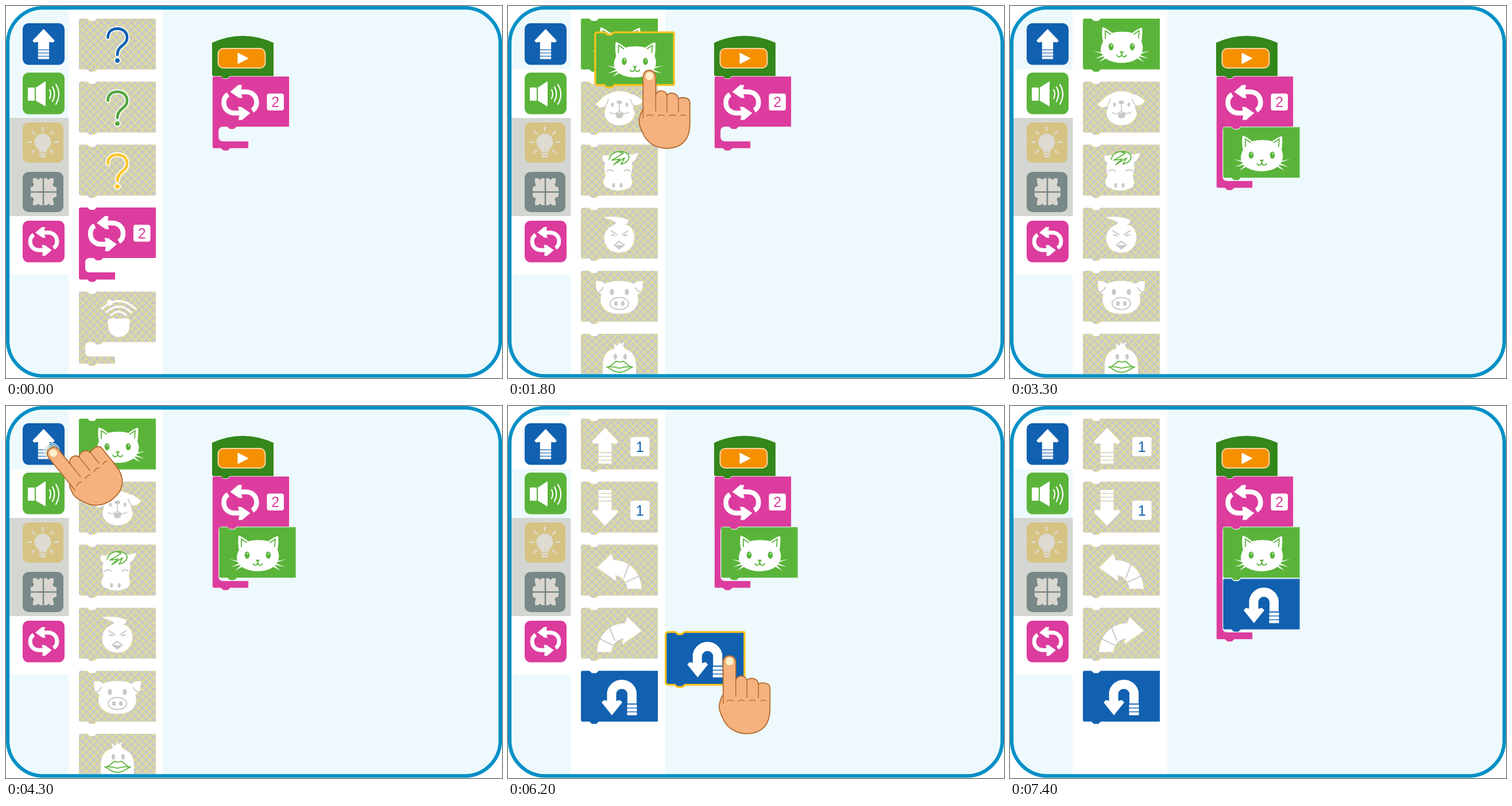
Animation of 864 by 648 pixels, one loop 9400 ms. Source, as an HTML page:

```html
<!DOCTYPE html>
<html lang="en">
<head>
<meta charset="utf-8">
<title>Block coding</title>
<style>
  html, body { margin: 0; width: 100%; height: 100%; overflow: hidden; background: #fff; }
  svg { display: block; width: 864px; height: 648px; }
  text { font: 25px "Liberation Sans", Arial, sans-serif; text-anchor: middle; }
  .w { fill: #fff; }
  .line { fill: none; stroke: #fff; stroke-linecap: round; }
  .g { fill: #c9c9c6; }
  .gl { fill: none; stroke: #c9c9c6; stroke-width: 2; stroke-linecap: round; }
  .skin { fill: #f6b27e; stroke: #b2692e; stroke-width: 1.8; stroke-linejoin: round; }
  .crease { fill: none; stroke: #b2692e; stroke-width: 1.5; stroke-linecap: round; }
  .edge { stroke: #f4fafa; stroke-width: .7; }
  .lit { stroke: #fdc21c; stroke-width: 6.5; stroke-linejoin: round; paint-order: stroke; }
</style>
</head>
<body>
<svg id="stage" viewBox="0 0 864 648"></svg>
<script>
const BLUE = '#1161b0', GREEN = '#5ab43a', PINK = '#dc3c9e', OFF = 'url(#off)';
const at = (x, y, body, more = '') => `<g transform="translate(${x} ${y}) ${more}">${body}</g>`;
const path = (d, attrs = 'class="w"') => `<path d="${d}" ${attrs}/>`;
const oval = (x, y, rx, ry, attrs = 'class="w"') =>
  `<ellipse cx="${x}" cy="${y}" rx="${rx}" ry="${ry}" ${attrs}/>`;
const box = (x, y, w, h, r, attrs = 'class="w"') =>
  `<rect x="${x}" y="${y}" width="${w}" height="${h}" rx="${r}" ${attrs}/>`;
const group = (id, body) => `<g id="${id}">${body}</g>`;

// Block outlines
const notch = 'c1 0 1.5 .5 2 1l2 2c.5 .5 1 1 2 1h6c1 0 1.5 -.5 2 -1l2 -2c.5 -.5 1 -1 2 -1';
const tab = 'c-1 0 -1.5 .5 -2 1l-2 2c-.5 .5 -1 1 -2 1h-6c-1 0 -1.5 -.5 -2 -1l-2 -2c-.5 -.5 -1 -1 -2 -1';
const plain = `M0 3Q0 0 3 0H14${notch}H134V88.6H32${tab}H3Q0 88.6 0 85.6Z`;
const wrap = gap => `M0 3Q0 0 3 0H14${notch}H134V88H43${tab}H19Q11 88 11 96V${80 + gap}` +
  `Q11 ${88 + gap} 19 ${88 + gap}H63V${100.5 + gap}H32${tab}H3Q0 ${100.5 + gap} 0 ${97.5 + gap}Z`;
const block = (d, fill, icon, cls = '') => path(d, `fill="${fill}" class="${cls}"`) + icon;

const digit = (x, y, size, n, color) => box(x, y, size, size, 4) +
  `<text x="${x + size / 2}" y="${y + size / 2 + 9}" fill="${color}">${n}</text>`;

// Icons
const half = path('M-2 -18.5H9C22 -18.5 28.5 -10 28.5 0C28.5 6 26 11 21 14', 'class="line" style="stroke-width:8.5;stroke-linecap:butt"') +
  path('M-17.5 -18.5L-3.5 -30.5H3L1 -18.5L4 -7.5L-2.5 -8Z');
const cycle = half + `<g transform="rotate(180)">${half}</g>`;
const loopIcon = at(48.5, 45.5, cycle) + digit(95, 30, 29.5, 2, PINK);

const bars = (x, y, w) => [0, 6.6, 13.2].map(d => box(x, y + d, w, 5.2, 0)).join('');
const arrow = path('M0 0L23 24L20 28L11.5 27V42.5H-11.5V27L-20 28L-23 24Z') + bars(-11.5, 44, 23);

const uturn = path('M53.5 54V38.5A18 18 0 0 1 89 38.5V57', 'class="line" style="stroke-width:16;stroke-linecap:butt"') +
  path('M36 55L40 51L54 54L68 51L72 55L54 77.5Z') + bars(80.5, 59, 17);

const turn = path('M28 40L53 16L57 27C85 27 104 48 106 77H81C80 65 73 56 60 53L62 64Z') +
  path('M85 32L75 57M102 54L79 65', 'class="gl"');

const ask = color => {
  const d = 'M50.5 33C50.5 23 57 17.5 67 17.5S84 24 84 33C84 47 67 46 67 63';
  return path(d, 'class="line" style="stroke-width:8.5"') +
    path(d, `fill="none" stroke="${color}" stroke-width="4.8" stroke-linecap="round"`) +
    oval(67, 73, 5, 5, `fill="${color}" stroke="#fff" stroke-width="2"`);
};

const robot = path('M40 30Q69 3 99 30', 'class="line" style="stroke-width:3.4"') +
  path('M48 36Q69 16 91 36', 'class="line" style="stroke-width:3.4"') +
  path('M56 41Q69 29 82 41', 'class="line" style="stroke-width:3.4"') + oval(54, 19.5, 5, 5) +
  path('M50 52Q50 47 56 47Q61 45 64 47H76Q79 45 83 47Q89 47 89 52C90 56 87 58 88 62C87 72 79 79 69.5 79S52 72 51 62C52 58 49 56 50 52Z');

const whiskers = 'M18 56L38 60L37 62.5ZM20 70L36 63L38 65.5ZM28 76L38 67L41 69Z';
const cat = path('M34 15C41 17 46 21 51 25C60 22 77 22 86 25C91 21 97 17 103 16C104 24 103 34 102 40C104 45 105 50 104 54C102 68 88 77 68 77S33 69 31 55C31 50 32 45 35 40C33 32 33 24 34 15Z') +
  path(whiskers) + at(135, 0, path(whiskers), 'scale(-1 1)') +
  [49, 86].map(x => oval(x, 49, 4.3, 6.2, `fill="${GREEN}"`) + oval(x + .8, 46.5, .9, 1.5)).join('') +
  path('M63.5 57H71.5L67.5 62Z', `fill="${GREEN}"`) +
  path('M59.5 63.5Q60 67 63.5 66.5Q67 66 67.5 61Q68 66 71.5 66.5Q75 67 75.5 63.5M39 34L39 21L48 27M97 34L98 21L89 27',
    `fill="none" stroke="${GREEN}" stroke-width="1.8" stroke-linecap="round"`);

const dog = path('M48 22C57 15 78 15 87 22C95 22 101 28 108 33C104 41 96 43 91 40C90 45 93 51 94 56C91 69 80 76 67 76S43 69 41 56C41 51 44 45 44 40C38 48 30 45 26 39C34 34 39 24 48 22Z') +
  [55, 80].map(x => oval(x, 40, 2.4, 3.6, 'class="g"')).join('') + oval(67, 36, 5, 3.2, 'class="g"') +
  path('M67 37V51M51 54Q59 59 67 51Q76 59 84 53M91 40Q87 36 86 30M44 40Q47 36 48 30', 'class="gl" style="stroke-width:1.6"') +
  path('M61 56Q67 52 74 56Q74 64 67 64T61 56Z', 'class="g"');

const horse = path('M38 18C43 20 47 19 52 18C58 11 75 11 83 17C89 18 94 16 99 14C99 22 94 28 89 31C91 42 87 50 87 56C92 66 88 77 78 77C73 81 55 81 50 76C39 76 36 64 43 55C42 46 39 39 43 32C38 30 37 24 38 18Z') +
  path('M45 47Q50 41 56 46M75 46Q80 41 86 46', 'class="gl"') +
  oval(57, 71, 2.5, 4, 'class="g"') + oval(70, 71, 2.5, 4, 'class="g"') +
  path('M49 26C51 18 58 12 66 12L74 15L54 27L68 25L57 35L76 23L70 34C78 32 83 28 84 22C83 14 75 11 66 12',
    `fill="#fff" stroke="${GREEN}" stroke-width="1.8" stroke-linejoin="round"`);

const chick = path('M39 17C52 14 72 16 82 21C84 26 80 28 77 29C103 36 97 79 67 78C38 78 33 45 51 33C57 30 60 29 61 26C55 21 47 19 39 17Z') +
  path('M52 40L63 47M82 40L72 47', 'class="gl"') +
  path('M51 48Q57 44 61 50ZM83 48Q77 44 73 50ZM57 65L67 57L77 65L67 73Z', 'class="g"') +
  path('M60 65L67 60L74 65Z');

const pig = path('M42 23C52 16 82 16 92 23C98 17 103 18 108 18C107 30 109 37 98 41C101 50 100 56 97 61C92 71 82 75 67 75S42 71 37 61C34 56 33 50 36 41C25 37 27 30 26 18C32 18 37 17 42 23Z') +
  [54, 80].map(x => oval(x, 37, 3.6, 5.5, 'class="g"')).join('') + oval(67, 57, 16, 10.5, 'class="gl"') +
  [61, 73].map(x => oval(x, 57, 3.2, 4.3, 'class="g"')).join('') +
  path('M28 38Q36 36 39 29M106 38Q98 36 95 29', 'class="gl"');

const duck = path('M58 26Q59 21 57 17L64 21Q65 16 68 14L69 19Q72 15 76 15L73 20Q75 23 76 26C92 31 95 42 96 54V76H38V54C39 42 42 30 58 26Z') +
  [60, 77].map(x => oval(x, 40, 3, 5, 'class="g"')).join('') +
  path('M45 58C54 58 58 48 63 48L68 49.5L73 48C78 48 82 58 90 58C83 60 79 67 67 67S53 60 45 58ZM45 58Q56 56 67 60Q79 56 90 58',
    `fill="#fff" stroke="${GREEN}" stroke-width="1.8" stroke-linejoin="round"`);

// Category column
const rays = [135, 180, 225, 270, 315, 0, 45].map(a =>
  `<path d="M19 0H27" transform="rotate(${a})" stroke="#dedbd2" stroke-width="2.6"/>`).join('');
const bulb = at(64, 237, rays + path('M-8 12A14.5 14.5 0 1 1 8 12L6 17H-6Z', 'fill="#dedbd2"') +
  box(-6.5, 18.5, 13, 3, 1, 'fill="#dedbd2"') + path('M-6 23H6L3 27H-3Z', 'fill="#dedbd2"'));
const puzzle = path('M47 300H53Q56 305 59 300H71Q74 305 77 300H83V308Q80 311 83 314L88 316V332L83 334Q80 337 83 340V347H77Q74 342 71 347H59Q56 342 53 347H47V340Q50 337 47 334L43 332V316L47 314Q50 311 47 308Z',
    'fill="#d9d6cf"') +
  path('M65 299V348M42 324H89', 'stroke="#788988" stroke-width="2.6"');
const categories =
  box(29, 30, 73, 72.5, 10, `fill="${BLUE}"`) + at(65.5, 40, arrow, 'scale(.84)') +
  box(29, 116, 73, 72.5, 10, `fill="${GREEN}"`) + box(38, 142, 12, 23, 1) + path('M52 142L69 131V175L52 165Z') +
  path('M76 146Q80 153 76 161M81 141Q88 153 81 166M87 137Q97 153 87 171', 'class="line" style="stroke-width:2.2"') +
  box(29, 203, 71, 70, 10, 'fill="#d6c384"') + bulb +
  box(29, 289, 71, 70, 10, 'fill="#788988"') + puzzle +
  box(29, 374, 73, 72.5, 10, `fill="${PINK}"`) + at(65.5, 410, cycle, 'scale(.82)');

// Palette panels: six rows, 110px apart
const row = (i, icon, fill = OFF) => at(127, 22 + i * 109.8, block(plain, fill, icon));
const panels = {
  loops: row(0, ask(BLUE)) + row(1, ask('#53a63f')) + row(2, ask('#fcc52c')) +
    at(127, 351, block(wrap(25), PINK, loopIcon)) + at(127, 497.5, block(wrap(25), OFF, robot)),
  sounds: row(0, cat, GREEN) + [dog, horse, chick, pig, duck].map((icon, i) => row(i + 1, icon)).join(''),
  moves: row(0, at(42, 16, arrow) + digit(86, 32, 33.5, 1, BLUE)) +
    row(1, at(42, 77, arrow, 'rotate(180)') + digit(86, 33, 33.5, 1, BLUE)) +
    row(2, turn) + row(3, at(134, 0, turn, 'scale(-1 1)')) + row(4, uturn, BLUE)
};

const hat = path(`M359 64Q412 40 466 64V122H391${tab}H362Q359 122 359 119Z`, 'fill="#34871b"') +
  box(369.5, 74, 82, 34, 9, 'fill="#f59000" stroke="#fbd7a4" stroke-width="2"') +
  path('M404 82L422 91.2L404 100.5Z', 'class="w" stroke="#fff" stroke-linejoin="round"');

// Hand, with the touch point as its origin
const hand = path('M-11.5 7C-11.5 -9 10.5 -9 10.5 7V38C12 28 29 28 30 39C32 32 49 33 50 45C52 41 70 41 70 51V89C70 116 55 131 30 131C8 131 -7 118 -12 104C-17 95 -20 84 -17 76C-16 70 -14 66 -11.5 63Z', 'class="skin"') +
  path('M10.5 38V66M30 39V68M50 45V68M-11.5 62V78M-5 74Q0 71 6 74M15 74Q20 71 25 74M34 74Q40 71 45 74M54 74Q59 71 63 74', 'class="crease"') +
  path('M-7.5 5C-7.5 -5 7 -5 7 5C7 15 -7.5 15 -7.5 5Z', 'fill="#fff0cb" stroke="#dca467"');
const rings = [13, 10, 7].map(r =>
  oval(0, 0, r, r, 'fill="#8dbb97" fill-opacity=".35" stroke="#fff" stroke-opacity=".85" stroke-width="1.5"')).join('');

document.getElementById('stage').innerHTML = `
  <defs>
    <pattern id="off" width="13" height="13" patternUnits="userSpaceOnUse">
      <rect width="13" height="13" fill="#c9c9c6"/>
      <path d="M0 0L13 13M13 0L0 13" stroke="#ebe67c" stroke-width="1.3"/>
    </pattern>
    <clipPath id="frame">${box(3, 3, 858, 641.5, 62)}</clipPath>
    <clipPath id="list">${box(109, 6, 165, 635, 0)}</clipPath>
  </defs>
  <g clip-path="url(#frame)">
    <rect width="864" height="648" fill="#edf9fc"/>
    ${box(109, 6, 165, 635.5, 0)}
    ${box(6, 195, 103.5, 171, 0, 'fill="#d4d7d1"')}
    ${box(6, 366, 103.5, 102, 0)}
    ${box(6, 0, 103.5, 85, 0, 'class="w" id="active"')}
    ${categories}
    <g clip-path="url(#list)">${Object.keys(panels).map(k => group(k, panels[k])).join('')}</g>
  </g>
  ${box(3, 3.2, 858, 641.2, 62, 'fill="none" stroke="#0490c6" stroke-width="6.2"')}
  ${hat}
  ${at(359.5, 122.5, `<path id="loop" class="edge" fill="${PINK}"/>` + loopIcon)}
  ${group('cat', at(371, 210.8, block(plain, GREEN, cat, 'edge')))}
  ${group('uturn', at(371, 300.8, block(plain, BLUE, uturn, 'edge')))}
  ${path(`M0 0H14${notch}h5`, 'id="snap" fill="none" stroke="#fdc21c" stroke-width="3.5"')}
  ${group('dragCat', block(plain, GREEN, cat, 'lit'))}
  ${group('dragUturn', block(plain, BLUE, uturn, 'lit'))}
  ${group('hand', group('rings', rings) + hand)}`;

const el = id => document.getElementById(id);
const show = (id, on) => { el(id).style.display = on ? '' : 'none'; };
const move = (id, x, y, more = '') => el(id).setAttribute('transform', `translate(${x} ${y}) ${more}`);

// Dragged block positions, one step every 300 ms
const STEP = 300, LOOP = 9400;
const drags = [
  { id: 'dragCat', start: 1500, grip: [93.3, 69.5], snap: 210.8,
    spots: [[126.3, 22.3], [153.5, 47.5], [193.3, 105.3], [236.5, 167.5], [281.8, 229.6], [370.5, 224.5]] },
  { id: 'dragUturn', start: 5300, grip: [110, 44.5], snap: 300.8,
    spots: [[126, 460.3], [166.8, 442.3], [224, 420.3], [276.3, 395.3], [329, 374.3], [362.5, 341.3], [371.5, 319.5]] }
];
// Taps: hand comes in large, then presses down smaller
const taps = [{ start: 500, x: 87.5, y: 173.5 }, { start: 4300, x: 79.5, y: 78 }];

function draw(t) {
  const panel = t < 1000 ? 'loops' : t < 4800 ? 'sounds' : 'moves';
  for (const k in panels) show(k, k === panel);
  show('active', panel !== 'loops');
  el('active').setAttribute('y', panel === 'sounds' ? 110 : 18);
  el('active').setAttribute('height', panel === 'sounds' ? 85 : 92);

  const inside = (t >= 3300) + (t >= 7400);
  el('loop').setAttribute('d', wrap([25, 94, 183.5][inside]));
  show('cat', inside > 0);
  show('uturn', inside > 1);

  const tap = taps.find(p => t >= p.start && t < p.start + 1000);
  show('rings', tap);
  if (tap) move('hand', tap.x, tap.y, `scale(${t < tap.start + 500 ? 1.01 : 0.9}) rotate(-39)`);

  let held = false, snap = false;
  for (const d of drags) {
    const i = Math.floor((t - d.start) / STEP), spot = d.spots[i];
    show(d.id, spot);
    if (!spot) continue;
    held = true;
    move(d.id, ...spot);
    move('hand', spot[0] + d.grip[0], spot[1] + d.grip[1]);
    if (i === d.spots.length - 1) {
      snap = true;
      move('snap', 371, d.snap);
    }
  }
  show('hand', held || tap);
  show('snap', snap);
}

const begin = performance.now();
function tick() {
  draw((performance.now() - begin) % LOOP);
  requestAnimationFrame(tick);
}
tick();
</script>
</body>
</html>
```
